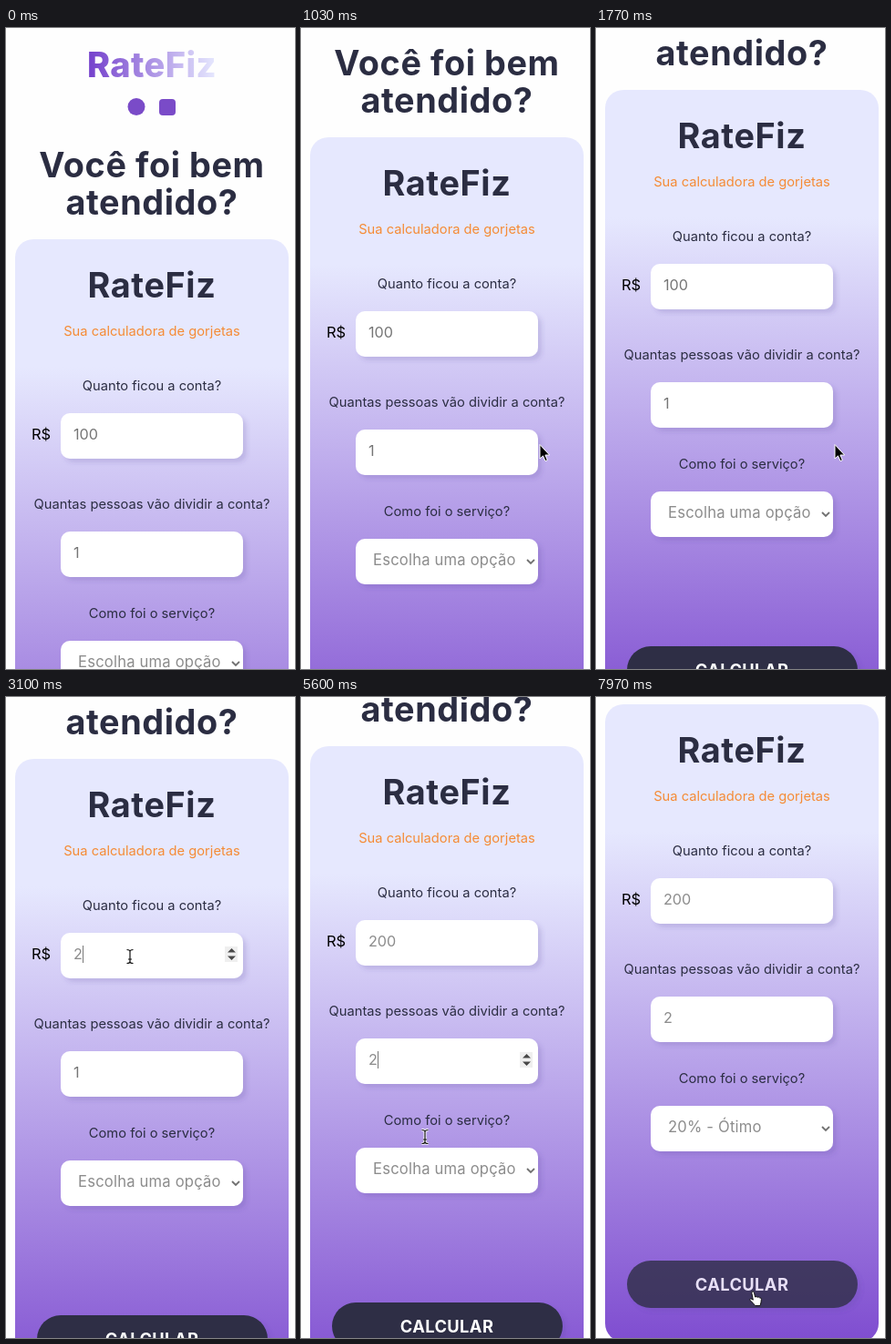
An HTML page that plays this animation: 317x704 px, repeating every 8 s.

```html
<!DOCTYPE html>
<html lang="pt-BR">
<head>
<meta charset="utf-8">
<title>Calculadora de gorjetas</title>
<style>
  html, body { margin: 0; width: 100%; height: 100%; overflow: hidden; background: #fefefe; }
  svg { display: block; width: 100vw; height: 100vh; font-family: Inter, "Open Sans", sans-serif; }
  text { white-space: pre; }
  .mid { text-anchor: middle; }
  .title { font-size: 37.8px; font-weight: 700; letter-spacing: .6px; fill: #2b2d42; }
  .label { font-size: 14.7px; fill: #2b2d42; }
  .field { font-size: 16.2px; fill: #8c8c8c; }
  .hint { fill: #757575; }
  .select { font-size: 16.6px; letter-spacing: .2px; fill: #8c8c8c; }
  .item { font-size: 15px; font-weight: 500; fill: #fff; }
  .off { visibility: hidden; }
</style>
</head>
<body>
<svg viewBox="0 0 317 704" preserveAspectRatio="none">
  <defs>
    <linearGradient id="cardFill" x2="0" y2="1">
      <stop offset=".2" stop-color="#e6e8fe"/>
      <stop offset="1" stop-color="#7f4dd0"/>
    </linearGradient>
    <linearGradient id="logoFill" gradientUnits="userSpaceOnUse" x1="90" x2="230">
      <stop stop-color="#7440cc"/>
      <stop offset="1" stop-color="#e6e8fe"/>
    </linearGradient>
    <filter id="soft" x="-10%" y="-20%" width="125%" height="150%">
      <feDropShadow dx="4" dy="4" stdDeviation="2.500" flood-color="#4a3592" flood-opacity=".17"/>
    </filter>
    <filter id="deep" x="-10%" y="-20%" width="120%" height="150%">
      <feDropShadow dx="0" dy="3" stdDeviation="4" flood-color="#000" flood-opacity=".35"/>
    </filter>
    <g id="spinner">
      <rect x="240" y="-8.500" width="14" height="17" fill="#efefef"/>
      <path d="M243 -2L247.500 -6.500L252 -2ZM243 2L247.500 6.500L252 2Z" fill="#484848"/>
    </g>
    <path id="caret" d="M0 -9.500V9.500" stroke="#777" stroke-width="1"/>
    <path id="beamLine" d="M-3.500 -7.500Q0 -7.500 0 -5.500V5.500Q0 7.500 -3.500 7.500M3.500 -7.500Q0 -7.500 0 -5.500M3.500 7.500Q0 7.500 0 5.500M-2 3H2" fill="none"/>
  </defs>

  <g id="page">
    <text class="mid" x="160" y="54" font-size="38" font-weight="800" letter-spacing=".4" fill="url(#logoFill)">RateFiz</text>
    <circle cx="143" cy="86.500" r="9.500" fill="#7a4bc8"/>
    <rect x="168" y="78" width="18" height="18" rx="4" fill="#7a4bc8"/>
    <text class="mid title" x="160" y="164">Você foi bem</text>
    <text class="mid title" x="160" y="205">atendido?</text>

    <rect x="10" y="232" width="300" height="700" rx="20" fill="url(#cardFill)"/>
    <text class="mid title" x="160" y="296">RateFiz</text>
    <text class="mid label" x="160" y="338" style="fill:#f58b35">Sua calculadora de gorjetas</text>

    <text class="mid label" x="160" y="398">Quanto ficou a conta?</text>
    <text x="28" y="452" font-size="16.500">R$</text>
    <g filter="url(#soft)" fill="#fff">
      <rect x="60" y="423" width="200" height="50" rx="10"/>
      <rect x="60" y="553" width="200" height="50" rx="10"/>
      <rect x="60" y="673" width="200" height="50" rx="10"/>
    </g>
    <text id="bill" class="field" x="74" y="452"></text>
    <use id="billSpin" href="#spinner" y="446.500"/>

    <text class="mid label" x="160" y="528">Quantas pessoas vão dividir a conta?</text>
    <text id="people" class="field" x="74" y="582"></text>
    <use id="peopleSpin" href="#spinner" y="576.500"/>
    <use id="bar" href="#caret"/>

    <text class="mid label" x="160" y="648">Como foi o serviço?</text>
    <text id="choice" class="select" x="79" y="702"></text>
    <path d="M248 696L252 700L256 696" fill="none" stroke="#707070" stroke-width="1.800"/>

    <g id="button" filter="url(#soft)">
      <rect x="34" y="843" width="253" height="52" rx="26" fill="#2d2f45"/>
      <text class="mid" x="160" y="875.500" font-size="18.300" font-weight="700" letter-spacing=".4" fill="#fff">CALCULAR</text>
    </g>
  </g>

  <g id="menu">
    <rect x="49.500" y="459.500" width="201" height="97" rx="5" fill="#333" stroke="#5c5c5c" filter="url(#deep)"/>
    <rect id="glow" x="50" y="485" width="200" height="22" fill="#1f62d6"/>
    <path d="M57 475L60 478.500L65 470" fill="none" stroke="#8f8f8f" stroke-width="1.300"/>
    <text class="item" x="71" y="479" style="fill:#9c9c9c;font-weight:400">Escolha uma opção</text>
    <text class="item" x="71" y="501">20% - Ótimo</text>
    <text class="item" x="71" y="523">10% - Bom</text>
    <text class="item" x="71" y="545">5% - Razoável</text>
  </g>

  <g id="pointer">
    <path id="arrow" d="M0 -.500V15L3.500 11.900L6 17.600L8.300 16.600L5.900 11H10.600Z" fill="#000" stroke="#fff" stroke-width="1"/>
    <g id="beam">
      <use href="#beamLine" stroke="#fff" stroke-width="3"/>
      <use href="#beamLine" stroke="#111" stroke-width="1.200"/>
    </g>
    <path id="hand" d="M-1.200 1.300Q-1 -.6 .4 0Q1.300 .3 1.500 1.400L2.600 6Q4.200 5 5.200 6.200Q6.700 5.500 7.500 6.800Q9.300 6.400 9.400 8.400L9 12L8 15.500H2.600Q0 12 -3 9.600Q-3.800 7.700 -2.200 7.700L.3 9.200Z" fill="#fff" stroke="#111" stroke-width="1"/>
  </g>
</svg>

<script>
const LOOP = 8000;

// [time, value]: each value holds until the next time
const scroll = [
  [0, 0], [140, 4], [290, 16], [440, 36], [590, 59], [740, 82], [880, 100], [1030, 112], [1180, 117],
  [1330, 130], [1480, 147], [1620, 159], [1770, 164],
  [5460, 168], [5600, 178], [5750, 196], [5900, 212], [6040, 221], [6190, 224]
];
const pointer = [
  [0, null], [740, [306, 452, 'arrow']], [880, [280, 456, 'arrow']], [1030, [262, 458, 'arrow']],
  [2060, [252, 446, 'arrow']], [2210, [206, 385, 'arrow']], [2360, [156, 306, 'beam']], [2510, [136, 285, 'beam']],
  [3830, [136, 293, 'beam']], [3980, [136, 325, 'arrow']], [4130, [136, 375, 'arrow']], [4270, [136, 405, 'beam']],
  [5310, [136, 430, 'arrow']], [5460, [136, 468, 'beam']], [5600, [136, 483, 'beam']],
  [5750, [146, 483, 'arrow']], [5900, [168, 478, 'arrow']], [6040, [192, 472, 'arrow']], [6190, [206, 469, 'arrow']],
  [6490, [208, 468, 'arrow']], [6790, [207, 474, 'arrow']], [6940, [205, 484, 'arrow']], [7090, [204, 489, 'arrow']],
  [7690, [197, 530, 'arrow']], [7830, [182, 602, 'arrow']], [7970, [172, 653, 'hand']]
];
const bill = [[0, ''], [3100, '2'], [3240, '20'], [3390, '200']];
const people = [[0, ''], [5170, '2']];
// caret place: [x, y] on the page
const caret = [
  [0, null], [2650, [75, 446.5]], [3100, [84.5, 446.5]], [3240, [95, 446.5]], [3390, [105.5, 446.5]],
  [4420, [75.5, 576.5]], [4870, null], [5170, [84.5, 576.5]], [6340, null]
];

const $ = id => document.getElementById(id);
const at = (steps, t) => steps.findLast(s => s[0] <= t)[1];
const show = (id, on) => $(id).classList.toggle('off', !on);
const within = (t, from, to) => t >= from && t < to;
const move = (id, x, y) => $(id).setAttribute('transform', `translate(${x} ${y})`);

function fill(id, value, hint) {
  $(id).textContent = value || hint;
  $(id).classList.toggle('hint', !value);
}

function draw(t) {
  move('page', 0, -at(scroll, t));

  fill('bill', at(bill, t), '100');
  fill('people', at(people, t), '1');
  $('choice').textContent = t < 7540 ? 'Escolha uma opção' : '20% - Ótimo';
  show('billSpin', within(t, 2360, 4420));
  show('peopleSpin', within(t, 4270, 6340));

  const c = at(caret, t);
  show('bar', c);
  if (c) move('bar', ...c);

  const open = within(t, 6340, 7540);
  $('menu').style.display = open ? '' : 'none';
  show('glow', t >= 6940);

  const p = at(pointer, t);
  $('pointer').style.display = p ? '' : 'none';
  if (p) {
    move('pointer', p[0], p[1]);
    for (const kind of ['arrow', 'beam', 'hand']) show(kind, kind === p[2]);
  }
  $('button').setAttribute('opacity', p && p[2] === 'hand' ? .8 : 1);
}

const start = performance.now();
function tick() {
  draw((performance.now() - start) % LOOP);
  requestAnimationFrame(tick);
}
tick();
</script>
</body>
</html>
```
